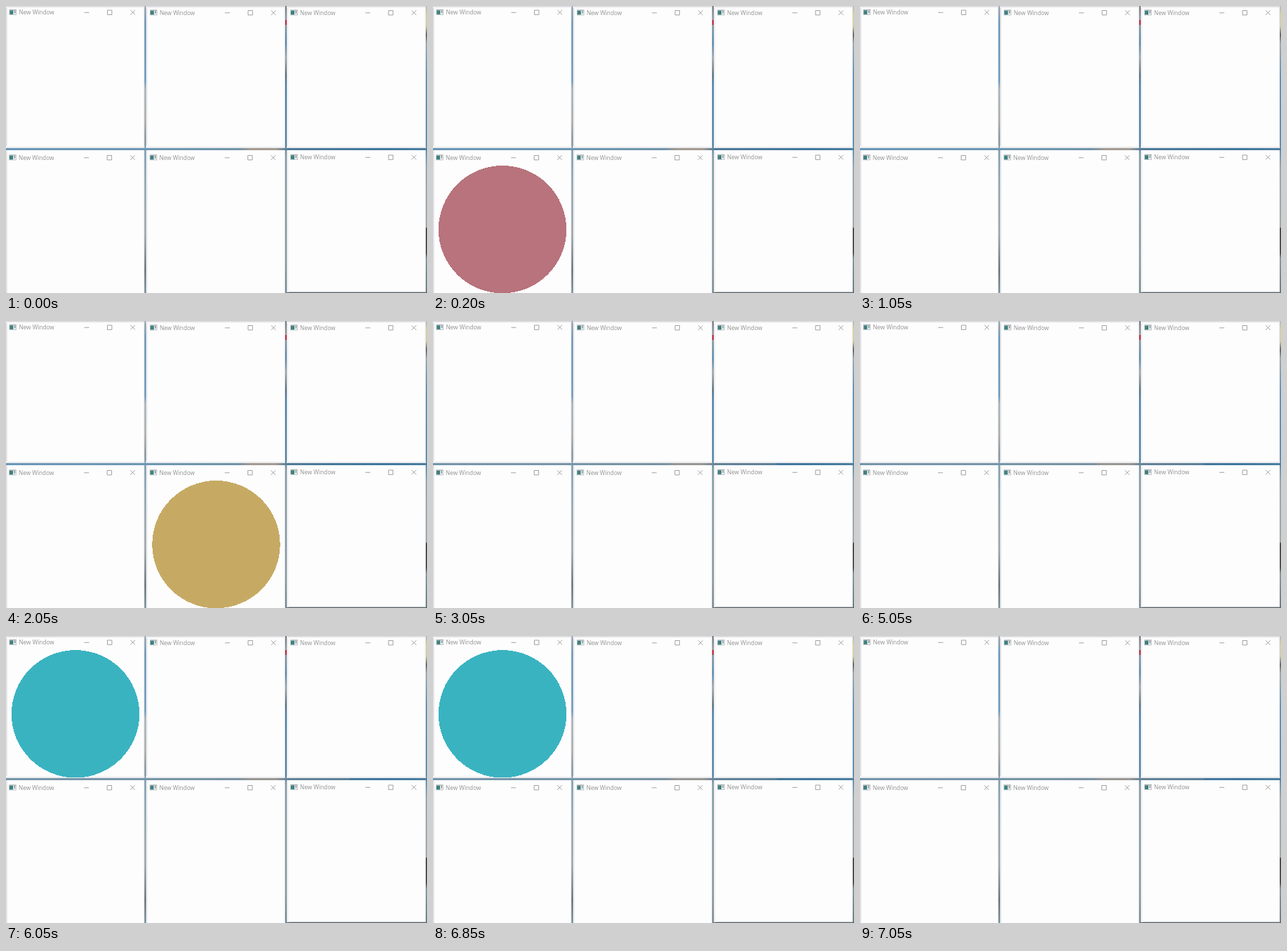
Animation, 600 px wide and 410 px high, one loop 8000 ms. Source, as an HTML page:

```html
<!DOCTYPE html>
<html lang="en">
<head>
<meta charset="utf-8">
<title>Windows</title>
<style>
  html, body { margin: 0; width: 100%; height: 100%; overflow: hidden; background: #fdfdfe; }
  svg { display: block; width: 600px; height: 410px; }
  text { font: 8.25px "Open Sans", "Noto Sans", sans-serif; fill: #929292; }
  .line { fill: none; stroke: #8c8c8c; stroke-width: .8; }
  .disc { opacity: 0; shape-rendering: crispEdges; }
</style>
</head>
<body>
<svg id="stage" viewBox="0 0 600 410">
  <defs id="defs"></defs>
</svg>
<script>
const LOOP = 8000;
const stage = document.getElementById('stage');
const defs = document.getElementById('defs');

function add(parent, tag, attrs, text) {
  const el = document.createElementNS('http://www.w3.org/2000/svg', tag);
  for (const key in attrs) el.setAttribute(key, attrs[key]);
  if (text) el.textContent = text;
  return parent.appendChild(el);
}

const rect = (parent, x, y, width, height, fill, more) =>
  add(parent, 'rect', { x, y, width, height, fill, ...more });

// stops: "offset color" pairs separated by commas
function gradient(id, vertical, stops) {
  const g = add(defs, 'linearGradient', { id, x2: vertical ? 0 : 1, y2: vertical ? 1 : 0 });
  for (const stop of stops.split(',')) {
    const [offset, color] = stop.trim().split(' ');
    add(g, 'stop', { offset, 'stop-color': color });
  }
  return `url(#${id})`;
}

// Shows an element between two times of the loop
function showBetween(el, from, to) {
  const frames = [
    { offset: 0, opacity: 0 },
    { offset: from / LOOP, opacity: 1 }
  ];
  if (to < LOOP) frames.push({ offset: to / LOOP, opacity: 0 });
  frames.push({ offset: 1, opacity: to < LOOP ? 0 : 1 });
  for (const f of frames) f.easing = 'step-end';
  el.animate(frames, { duration: LOOP, iterations: Infinity });
}

// Desktop strips between the windows
const seamA = gradient('seamA', true,
  '0 #8b97a0, .06 #4d82ad, .26 #4c87b3, .29 #9aa6ac, .4 #9a9e9c, .46 #75828a, .5 #5f8ba6, .6 #7795a3, .8 #89969a, .92 #48565f, 1 #5f7c89');
const seamB = gradient('seamB', true,
  '0 #6f7a80, .045 #8e969a, .13 #4f86ab, .18 #9ba5a9, .24 #526c7b, .28 #3d7fb0, .49 #4a80a4, .52 #7c98a5, .9 #7e959f, 1 #6d858f');
const seamC = gradient('seamC', true,
  '0 #a5adb0, .03 #d9cc85, .07 #d3c88f, .1 #41474a, .13 #8c9da6, .25 #3f7fae, .5 #397aa8, .56 #8297a3, .77 #8d9aa0, .775 #252524, .86 #302e29, .88 #6b8791, 1 #4b6470');
const seamH = gradient('seamH', false,
  '0 #6a97b7, .3 #6d98b4, .55 #6f93a9, .58 #a39a92, .64 #a49c95, .67 #4f7b98, .9 #3f779e, 1 #4d7f9f');

rect(stage, 197, 0, 3, 410, seamA);
rect(stage, 397.5, 0, 2.5, 410, seamB);
rect(stage, 598, 0, 2, 410, seamC);
rect(stage, 0, 202.5, 600, 3.5, seamH);
rect(stage, 398, 20, 2, 7, '#c2223a');
const haze = rect(stage, 0, 202.5, 490, 3.5, '#8a9296', { 'fill-opacity': .35 });
rect(stage, 400, 408, 199, 2, '#5a6468');

const sideShade = gradient('sideShade', false, '0 #d3d3d5, .4 #ececee, 1 #fdfdfe');
const topShade = gradient('topShade', true, '0 #cfcfd1, .5 #ebebed, 1 #fdfdfe');
const lowShade = gradient('lowShade', true, '0 #fdfdfe, 1 #e3e3e6');

// x, y, width, height, title offset x, title offset y
const windows = [
  [0, 0, 197.3, 203, 0, 0],
  [199.6, 0, 198, 203, 200.5, .5],
  [400, 0, 198.3, 203, 400.7, .5],
  [0, 206, 197.3, 204, -.3, 207.5],
  [199.6, 206, 198, 204, 200.2, 207.5],
  [400, 206, 198.3, 202.6, 400.7, 207]
];

// window index, centre x, centre y, color, start, end
const discs = [
  [3, 99, 319.2, '#b8737c', 50, 1050],
  [4, 299.5, 319.2, '#c6aa64', 2050, 3050],
  [5, 499.5, 318.6, '#7d93bd', 4050, 5050],
  [0, 99, 111.3, '#3ab3c1', 6050, 7050]
];

function titleBar(dx, dy) {
  const g = add(stage, 'g', { transform: `translate(${dx} ${dy})` });
  rect(g, 4.6, 4.8, 10.4, 8, '#aeb4b6');
  rect(g, 5.3, 6.3, 9, 5.8, '#e9eeee');
  rect(g, 5.3, 6.3, 5, 5.6, '#3f7f80');
  rect(g, 11.8, 6.6, 1.6, 3.4, '#8a9496');
  add(g, 'text', { x: 18.4, y: 12 }, 'New Window');
  add(g, 'path', { class: 'line', d: 'M111.5 9.3h7M144.5 6h6.4v6.4h-6.4zM177.4 5.8l6.6 6.6m0-6.6l-6.6 6.6' });
}

windows.forEach(([x, y, w, h, dx, dy], i) => {
  rect(stage, x, y, w, h, '#fdfdfe');
  rect(stage, x, y, 3, h, sideShade);
  if (y === 0) {
    rect(stage, x, 0, w, 3, topShade);
    rect(stage, x, h - 3, w, 3, lowShade);
  }
  rect(stage, x + w - .8, y, .8, h, '#d9dadd');
  titleBar(dx, dy);

  const disc = discs.find(d => d[0] === i);
  if (!disc) return;
  const [, cx, cy, fill, from, to] = disc;
  const clip = add(defs, 'clipPath', { id: 'clip' + i });
  rect(clip, x, y, w, h);
  const el = add(stage, 'circle', {
    cx, cy, r: 91.2, fill, class: 'disc', 'clip-path': `url(#clip${i})`
  });
  showBetween(el, from, to);
});

showBetween(haze, 2650, LOOP);
</script>
</body>
</html>
```
